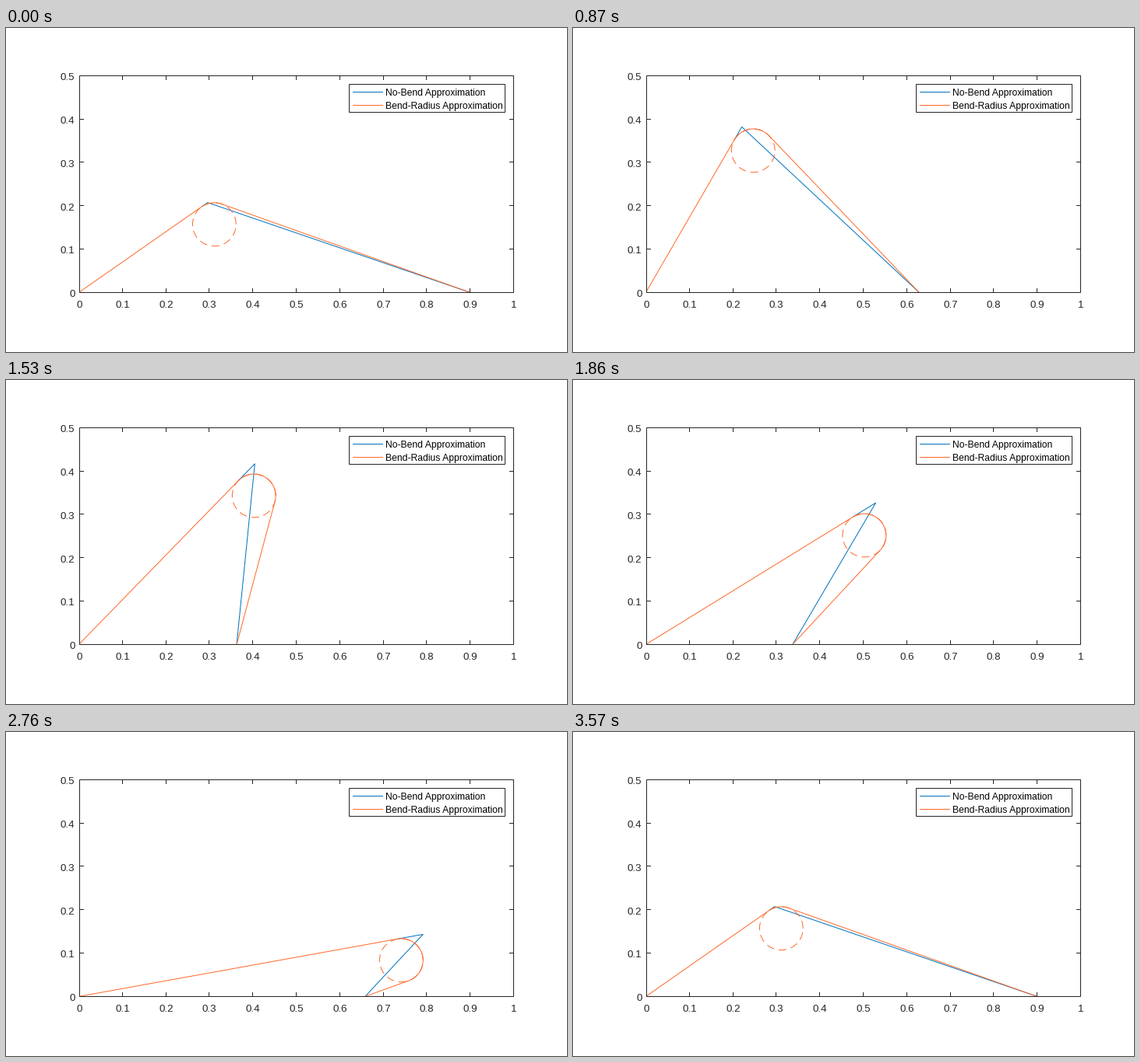
A matplotlib script for the animation above (3600 ms loop, 720 px wide and 417 px high).

```python
import numpy as np
import matplotlib.pyplot as plt
from matplotlib.animation import FuncAnimation
from matplotlib.patches import Rectangle

W, H, DPI = 720, 417, 96
FRAMES, INTERVAL = 120, 30
X0, Y0, SCALE = 93.5, 340.4, 558      # plot origin and pixels per unit
LEFT, RIGHT, TOP, BOTTOM = 94.5, 651.5, 61.5, 340.5
RADIUS, LENGTH = 0.05, 1.0            # bend radius, total length of the strip
BLUE, ORANGE, DARK = "#0072BD", "#FF6929", "#262626"
PX = 72 / DPI                         # one pixel in points

fig = plt.figure(figsize=(W / DPI, H / DPI), dpi=DPI, facecolor="white")
ax = fig.add_axes([0, 0, 1, 1])
ax.set(xlim=(0, W), ylim=(H, 0))
ax.axis("off")


def line(xs, ys, color, z, **kw):
    return ax.plot(xs, ys, color=color, lw=PX, zorder=z, snap=False,
                   solid_capstyle="butt", **kw)[0]


def label(x, y, s, size, ha, color):
    ax.text(x, y, s, fontsize=size * PX, family="Liberation Sans",
            ha=ha, va="baseline", color=color, zorder=6)


def box(x0, y0, x1, y1, z, fill):
    ax.add_patch(Rectangle((x0, y0), x1 - x0, y1 - y0, lw=PX, ec=DARK,
                           fc=fill, zorder=z, snap=False))


def draw_axes():
    box(LEFT, TOP, RIGHT, BOTTOM, 4, "none")
    tick = 5.5
    for k in range(11):
        x = X0 + SCALE * k / 10
        label(x + 0.3, 360, f"{k / 10:g}", 13.33, "center", DARK)
        if 0 < k < 10:
            col = int(x) + 0.5
            line([col, col], [BOTTOM, BOTTOM - tick], DARK, 4)
            line([col, col], [TOP, TOP + tick], DARK, 4)
    for k in range(6):
        y = Y0 - SCALE * k / 10
        label(88.5, round(y + 5.8), f"{k / 10:g}", 13.33, "right", DARK)
        if 0 < k < 5:
            row = int(y) + 0.5
            line([LEFT, LEFT + tick], [row, row], DARK, 4)
            line([RIGHT, RIGHT - tick], [row, row], DARK, 4)


def draw_legend():
    box(440.5, 72.5, 640.5, 108.5, 5, "white")
    rows = [(82.5, BLUE, "No-Bend Approximation"),
            (99.5, ORANGE, "Bend-Radius Approximation")]
    for y, color, name in rows:
        line([445, 484], [y, y], color, 6)
        label(487, y + 4.5, name, 12.1, "left", "black")


def bend(l, theta, end):
    """Circle centre, turning angle and strip length for first segment l."""
    c = np.array([l * np.cos(theta) + RADIUS * np.sin(theta),
                  l * np.sin(theta) - RADIUS * np.cos(theta)])
    dx, dy = end - c[0], -c[1]
    q = np.sqrt(max(dx * dx + dy * dy - RADIUS ** 2, 1e-9))
    out = np.arctan2(dy, dx) - np.arctan2(RADIUS, q)
    turn = (theta - out) % (2 * np.pi)
    return c, turn, l + RADIUS * turn + q


def solve_bend(theta, end):
    """First segment length that gives the strip its full length."""
    lo, hi = 0.2, 0.95
    for _ in range(40):
        mid = (lo + hi) / 2
        if bend(mid, theta, end)[2] < LENGTH:
            lo = mid
        else:
            hi = mid
    return lo


def circle(c, angles):
    return c[0] + RADIUS * np.cos(angles), c[1] + RADIUS * np.sin(angles)


def place(artist, xs, ys):
    artist.set_data(X0 + SCALE * np.asarray(xs), Y0 - SCALE * np.asarray(ys))


draw_axes()
draw_legend()
sharp = line([], [], BLUE, 2)
ring = line([], [], ORANGE, 3, linestyle=(0, (10, 6)), dash_capstyle="butt")
smooth = line([], [], ORANGE, 3)
window = Rectangle((94, 61), 558, 280, transform=ax.transData)
for artist in (sharp, ring, smooth):
    artist.set_clip_path(window)


def update(i):
    phase = 2 * np.pi * i / (FRAMES - 1)
    theta = np.radians(35 + 25 * np.sin(phase))
    end = 0.6175 + 0.2825 * np.cos(phase)
    ux, uy = np.cos(theta), np.sin(theta)

    straight = solve_bend(theta, end)
    c, turn, _ = bend(straight, theta, end)
    start = theta + np.pi / 2
    xs, ys = circle(c, np.linspace(start, start - turn, 60))
    place(smooth, [0, *xs, end], [0, *ys, 0])
    place(ring, *circle(c, np.linspace(0, 2 * np.pi, 100)))

    # The two strips share their first part, so blue starts where they split.
    corner = (LENGTH ** 2 - end ** 2) / (2 * (LENGTH - end * ux))
    place(sharp, [straight * ux, corner * ux, end],
          [straight * uy, corner * uy, 0])
    return sharp, ring, smooth


anim = FuncAnimation(fig, update, frames=FRAMES, interval=INTERVAL,
                     repeat=True, repeat_delay=0)
plt.show()
```
